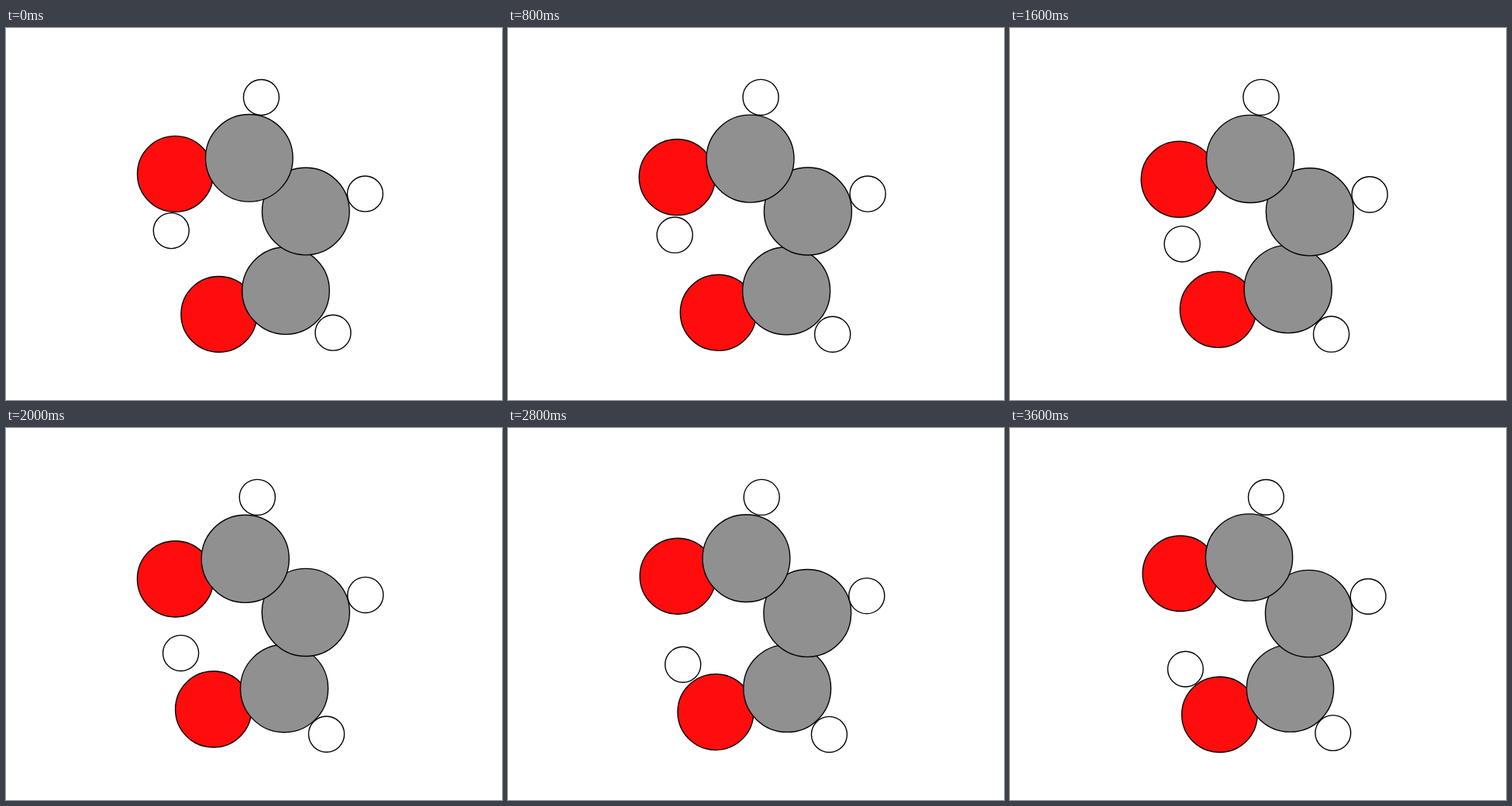
Animation of 640x480 px, one loop 3.8 s. Source, as an HTML page:

```html
<!DOCTYPE html>
<html lang="en">
<head>
<meta charset="utf-8">
<title>Proton transfer</title>
<style>
  html, body { margin: 0; width: 100%; height: 100%; overflow: hidden; background: #fff; }
  svg { display: block; width: 100%; height: 100%; }
  circle { stroke: #000; stroke-width: 1.39; }
</style>
</head>
<body>
<svg id="stage" viewBox="0 0 640 480"></svg>
<script>
const LOOP = 3800, STEP = 200;
const stage = document.getElementById('stage');

// Covalent radius and colour of each element
const kinds = {
  O: { radius: 0.66, fill: '#ff0d0d' },
  C: { radius: 0.76, fill: '#909090' },
  H: { radius: 0.31, fill: '#fff' }
};

// A straight drift plus sine harmonics that vanish at both ends; u runs 0 to 1
const path = (start, drift = 0, ...waves) => u => waves.reduce(
  (sum, size, i) => sum + size * Math.sin((i + 1) * Math.PI * u),
  start + drift * u
);

function atom(kind, x, y) {
  const node = document.createElementNS(stage.namespaceURI, 'circle');
  node.setAttribute('fill', kinds[kind].fill);
  stage.append(node);
  return { node, x, y, radius: kinds[kind].radius };
}

const zoom = path(74.1, -0.2, 0.45);

// From back to front
const atoms = [
  atom('O', path(218.4, 1.5, -0.7), path(188.3, -0.6, 6.7, 0.5, -0.5)),
  atom('O', path(274.8, -4.4, -4.6, 0.5), path(369.4, 0.3, -5.6, 0.5, 1.1)),
  atom('C', path(361, 0.5, -2.4, -0.4), path(339, -3, -0.5, 0.8, 0.5)),
  atom('C', path(386.8, -1.2, 0.7), path(236.5, 3, -0.4, -0.4)),
  atom('C', path(313.8, -5.3, -1.8, 1.1), path(167.8, -0.8, 1.5)),
  atom('H', path(329.4, 1, -5.5, -0.3, 0.4), path(89.4)),
  atom('H', path(463.4, -1.3, 1.2, 0.3), path(213.9, 3.5, -0.5, -0.3)),
  atom('H', path(422, -5.2, -5, 0.7, 0.5), path(393.2, 0.3, 2.3, 0, 0.6)),
  // The proton that hops from one oxygen to the other
  atom('H', path(213.2, 13.2, 2.9, -1.8, -1.4, 0.5), path(261.6, 49.5, -1.2, -6, 0.7, 1.7))
];

function draw(ms) {
  const u = Math.floor((ms % LOOP) / STEP) * STEP / (LOOP - STEP);
  for (const { node, x, y, radius } of atoms) {
    node.setAttribute('cx', x(u).toFixed(2));
    node.setAttribute('cy', y(u).toFixed(2));
    node.setAttribute('r', (radius * zoom(u)).toFixed(2));
  }
}

const start = performance.now();
function tick() {
  draw(performance.now() - start);
  requestAnimationFrame(tick);
}
tick();
</script>
</body>
</html>
```
